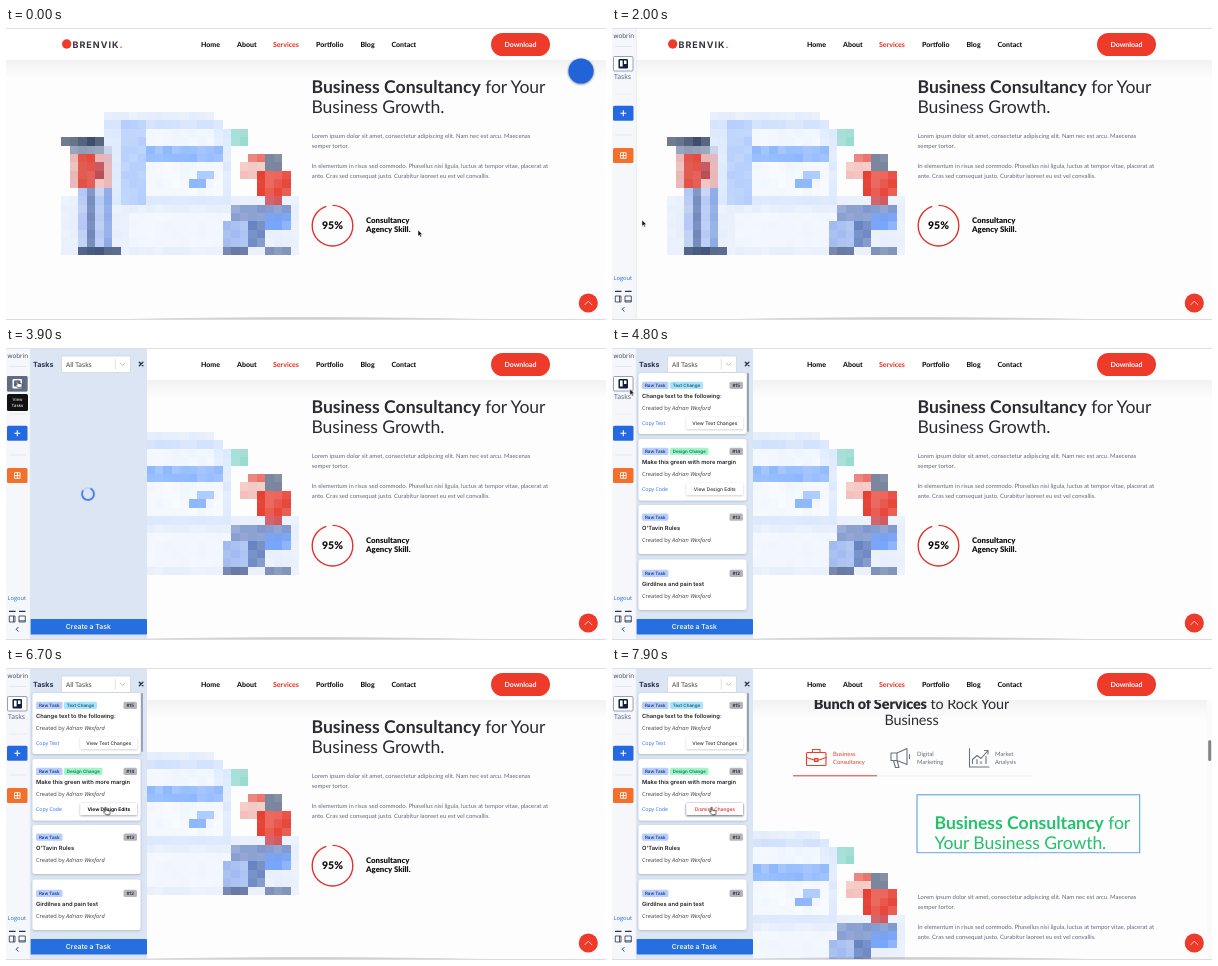
Animation of 600x292 px, one loop 8000 ms. Source, as an HTML page:

```html
<!DOCTYPE html>
<html lang="en">
<head>
<meta charset="utf-8">
<title>Consultancy page with task panel</title>
<style>
html, body { margin: 0; width: 100%; height: 100%; overflow: hidden; background: #fdfdfd; }
svg { display: block; width: 600px; height: 292px; }
text { font-family: Lato, sans-serif; text-rendering: geometricPrecision; white-space: pre; }
.mid { text-anchor: middle; }
.b { font-weight: 700; }
.black { font-weight: 900; }
.head { font-size: 17.6px; fill: #2d2b31; letter-spacing: -.1px; }
.head .b { letter-spacing: 0; }
.green { fill: #23c26b; }
.sub { font-size: 14.4px; }
.para { font-size: 5.96px; fill: #646a7e; }
.nav { font-size: 7px; font-weight: 800; fill: #111; }
.tab { font-size: 5.9px; fill: #666b7a; }
.red { fill: #ee3a2b; }
.ui { font-family: Inter, sans-serif; }
.os { font-family: "Open Sans", sans-serif; }
.title { font-size: 5.75px; font-weight: 600; fill: #222; }
.by { font-size: 5.7px; fill: #444; }
.chip { font-size: 4.5px; font-weight: 600; }
.link { font-size: 5.2px; fill: #2a6fe0; }
.btn { font-size: 4.9px; font-weight: 500; fill: #333; }
.line { fill: none; stroke-linecap: round; stroke-linejoin: round; }

/* hard switches */
.gone, .bar, .tip, .panel, .load, .cards, .hover, .old, .new, .drop, .dismiss, .thumb, .arrow, .hand {
  animation: 8s step-end infinite;
}
.gone { animation-name: gone; }
.bar { animation-name: bar; }
.tip { animation-name: tip; }
.panel { animation-name: panel; }
.load { animation-name: load; }
.cards { animation-name: cards; }
.hover { animation-name: hover; }
.old { animation-name: old; }
.new { animation-name: new; }
.drop { animation-name: drop; }
.dismiss, .thumb { animation-name: dismiss; }
.arrow { animation-name: arrow; }
.hand { animation-name: hand; }
@keyframes gone { 0% { opacity: 1 } 12.4%, 100% { opacity: 0 } }
@keyframes bar { 0% { opacity: 0 } 12.4%, 100% { opacity: 1 } }
@keyframes tip { 0% { opacity: 0 } 43.7% { opacity: 1 } 60%, 100% { opacity: 0 } }
@keyframes panel { 0% { opacity: 0 } 47.4%, 100% { opacity: 1 } }
@keyframes load { 0% { opacity: 1 } 56.2%, 100% { opacity: 0 } }
@keyframes cards { 0% { opacity: 0 } 56.2%, 100% { opacity: 1 } }
@keyframes hover { 0% { opacity: 0 } 68.7%, 100% { opacity: 1 } }
@keyframes old { 0% { opacity: 1 } 91.2%, 100% { opacity: 0 } }
@keyframes new { 0% { opacity: 0 } 91.2%, 100% { opacity: 1 } }
@keyframes drop { 0% { transform: none } 91.2%, 100% { transform: translateY(42.3px) } }
@keyframes dismiss { 0% { opacity: 0 } 92.4%, 100% { opacity: 1 } }
@keyframes arrow {
  0% { opacity: 1 } 8.5% { opacity: 0 } 12.4% { opacity: 1 } 43% { opacity: 0 }
  60% { opacity: 1 } 67% { opacity: 0 } 100% { opacity: 0 }
}
@keyframes hand {
  0% { opacity: 0 } 8.5% { opacity: 1 } 12.4% { opacity: 0 } 43% { opacity: 1 }
  60% { opacity: 0 } 67% { opacity: 1 } 100% { opacity: 1 }
}

/* continuous motion */
.scroll { animation: scroll 8s ease-in-out infinite; }
.cursor { animation: cursor 8s ease-in-out infinite; }
.spin { transform-origin: 82px 146px; animation: spin .9s linear infinite; }
@keyframes scroll { 0%, 92.4% { transform: none } 98.6%, 100% { transform: translateY(78.5px) } }
@keyframes spin { to { transform: rotate(360deg) } }
@keyframes cursor {
  0%, 2% { transform: translate(412px, 202px) }
  8.75% { transform: translate(573px, 44px) }
  13.75%, 15.5% { transform: translate(568px, 46px) }
  24% { transform: translate(30px, 192px) }
  36.25% { transform: translate(21.5px, 184px) }
  43%, 58% { transform: translate(10.5px, 32px) }
  68%, 100% { transform: translate(98.5px, 139px) }
}
</style>
</head>
<body>
<svg viewBox="0 0 600 292">
  <defs>
    <linearGradient id="shade" x2="0" y2="1">
      <stop stop-color="#000" stop-opacity=".045"/><stop offset="1" stop-color="#000" stop-opacity="0"/>
    </linearGradient>
    <radialGradient id="edge" cy="1" r=".5" fy="1">
      <stop stop-color="#666" stop-opacity=".35"/><stop offset=".75" stop-color="#666" stop-opacity=".25"/>
      <stop offset="1" stop-color="#666" stop-opacity="0"/>
    </radialGradient>
    <filter id="soft" x="-20%" y="-30%" width="140%" height="170%">
      <feDropShadow dx="0" dy=".8" stdDeviation="1" flood-color="#234" flood-opacity=".25"/>
    </filter>
    <filter id="glow" x="-30%" y="-30%" width="160%" height="160%">
      <feDropShadow dx="0" dy=".6" stdDeviation="1.300" flood-color="#123" flood-opacity=".6"/>
    </filter>
  </defs>
  <rect width="600" height="292" fill="#fdfdfd"/>

  <g class="scroll">
    <text class="head sub mid" x="299.500" y="-37.500"><tspan class="black">Bunch of Services</tspan> to Rock Your</text>
    <text class="head sub mid" x="299.500" y="-22">Business</text>
    <path d="M181 29.500H420" stroke="#e6e6ea" stroke-width=".6"/>
    <path d="M181 29.300H265" stroke="#ee3a2b"/>
    <g class="line" stroke="#ee3a2b" stroke-width="1.100">
      <rect x="194.500" y="6" width="19.500" height="13" rx="1"/>
      <path d="M200.500 6V3H208V6M194.500 11L202 13.500H207L214 11M202.500 12H206V15H202.500Z"/>
    </g>
    <g class="line" stroke="#6b7182" stroke-width="1.100">
      <path d="M279 6.500H285L295 2V18L285 14H279ZM285 6.500V14M281.500 14L283.500 21H287L285 14M297.500 8V12"/>
      <path d="M357.500 2V20.500H377M360.500 17V13L365 9L369 12L376 4M372.500 4H376V7.500M365 17V13M369 17V15M374 17V10"/>
    </g>
    <g class="tab">
      <text class="tab red" x="221" y="9">Business</text><text class="tab red" x="221" y="17.500">Consultancy</text>
      <text x="305" y="9">Digital</text><text x="305" y="17.500">Marketing</text>
      <text x="383" y="9">Market</text><text x="383" y="17.500">Analysis</text>
    </g>

    <g id="mosaic" shape-rendering="crispEdges"></g>

    <g class="old">
      <text class="head" x="305.500" y="65"><tspan class="b">Business Consultancy</tspan> for Your</text>
      <text class="head" x="305.500" y="85">Business Growth.</text>
    </g>
    <g class="new">
      <rect x="305" y="48.300" width="222.700" height="58" fill="none" stroke="#4f98e6"/>
      <text class="head green" x="322.500" y="82"><tspan class="b">Business Consultancy</tspan> for</text>
      <text class="head green" x="322.500" y="102">Your Business Growth.</text>
    </g>
    <g class="drop">
      <g class="para">
        <text x="305.700" y="110">Lorem ipsum dolor sit amet, consectetur adipiscing elit. Nam nec est arcu. Maecenas</text>
        <text x="305.700" y="120">semper tortor.</text>
        <text x="305.700" y="140.300">In elementum in risus sed commodo. Phasellus nisi ligula, luctus at tempor vitae, placerat at</text>
        <text x="305.700" y="150.300">ante. Cras sed consequat justo. Curabitur laoreet eu est vel convallis.</text>
      </g>
      <circle cx="326.500" cy="197.700" r="20.300" fill="none" stroke="#e0322b" stroke-width="1.400"
        pathLength="100" stroke-dasharray="95 100" transform="rotate(-90 326.500 197.700)"/>
      <text class="mid black" x="326.500" y="201.300" font-size="10.500" fill="#111">95%</text>
      <text class="black" x="360" y="195.300" font-size="7.800" fill="#111">Consultancy</text>
      <text class="black" x="360" y="204.300" font-size="7.800" fill="#111">Agency Skill.</text>
    </g>
  </g>

  <rect y="32" width="600" height="18" fill="url(#shade)"/>
  <rect width="600" height="32" fill="#fff"/>
  <path d="M0 .5H600" stroke="#e0e0e2"/>
  <circle cx="60.700" cy="16" r="4.700" class="red"/>
  <text class="ui b" x="66.500" y="19.500" font-size="9" letter-spacing="1" fill="#33313a">BRENVIK<tspan class="red">.</tspan></text>
  <g class="nav">
    <text x="195" y="18.800">Home</text><text x="231" y="18.800">About</text>
    <text class="nav red" x="267" y="18.800">Services</text><text x="310" y="18.800">Portfolio</text>
    <text x="354.500" y="18.800">Blog</text><text x="385.500" y="18.800">Contact</text>
  </g>
  <rect x="485" y="5" width="59" height="23" rx="11.500" class="red"/>
  <text class="mid b" x="514.500" y="18.700" font-size="7" fill="#fff">Download</text>

  <circle cx="582.300" cy="275" r="9.600" class="red"/>
  <path class="line" d="M578.700 276.800L582.300 273.200L585.900 276.800" stroke="#fff" stroke-width=".8"/>
  <circle class="gone" cx="575" cy="43" r="12.600" fill="#2264d8" filter="url(#glow)"/>
  <rect x="118" y="287" width="364" height="4" fill="url(#edge)"/>
  <path d="M0 291.500H600" stroke="#dcdcde"/>
  <g class="thumb">
    <rect x="595" y="32" width="5" height="259" fill="#fafafa"/>
    <rect x="596.200" y="72" width="3" height="21" rx="1.500" fill="#858585"/>
  </g>

  <g class="panel">
    <rect x="24" y="1" width="117" height="290" fill="#dbe5f4"/>
    <text class="ui b" x="27" y="18.500" font-size="7.100" fill="#25304a">Tasks</text>
    <rect x="55.500" y="8" width="69" height="16.500" rx="1.500" fill="#fff" stroke="#c9ced8" stroke-width=".6"/>
    <text class="os" x="60" y="18.700" font-size="6.600" fill="#333">All Tasks</text>
    <path d="M109.300 11V21.500" stroke="#ccc" stroke-width=".6"/>
    <path class="line" d="M114.300 15L116.700 17.400L119.100 15" stroke="#bbb"/>
    <path class="line" d="M133.300 14.200L136.900 17.800M136.900 14.200L133.300 17.800" stroke="#25304a" stroke-width="1.300"/>
    <g class="load">
      <circle cx="82" cy="146" r="6" fill="none" stroke="#c3d3ec" stroke-width="1.600"/>
      <path class="line spin" d="M76 146A6 6 0 1 1 82 152" stroke="#2f6fd8" stroke-width="1.700"/>
    </g>
    <g id="cards" class="cards"></g>
    <rect x="24" y="271" width="117" height="15.500" rx="1" fill="#266fe0"/>
    <text class="ui mid" x="82.300" y="281.300" font-size="6.900" font-weight="500" fill="#fff">Create a Task</text>
  </g>

  <g class="bar">
    <rect y="1" width="24" height="290" fill="#f5f7fb"/>
    <path d="M24.300 1V291" stroke="#e3e8f0" stroke-width=".8"/>
    <text class="os" x="1.500" y="10" font-size="6.300" fill="#34415c">wobrin</text>
    <path d="M3 18.500H20M3 66H20M3 107H20" stroke="#dde2ea" stroke-width=".7"/>
    <rect x="1.500" y="28.500" width="19.500" height="14.500" rx="1" fill="#fff" stroke="#6d7b93" stroke-width=".7"/>
    <rect x="6.500" y="31" width="9.500" height="9.500" rx="1.200" fill="#14213d"/>
    <path d="M8 32.500H10.600V38.500H8ZM12 32.500H14.500V36H12Z" fill="#fff"/>
    <text class="os" x="2" y="51.300" font-size="6.800" fill="#505c74">Tasks</text>
    <rect x="1" y="77.700" width="20.500" height="15" rx="1.500" fill="#2469e0"/>
    <path d="M8.300 85.200H14.300M11.300 82.200V88.200" stroke="#fff" stroke-width="1.100"/>
    <rect x="1" y="120" width="20.500" height="15" rx="1.500" fill="#f3702c"/>
    <path d="M8.500 124.700H14.100V130.300H8.500ZM8.500 127.500H14.100M11.300 124.700V130.300" fill="none" stroke="#fff" stroke-width=".9"/>
    <text class="os" x="1.500" y="251.500" font-size="5.700" fill="#2469e0">Logout</text>
    <path d="M3 263.300H9.500M13 263.300H19.500" stroke="#26334f" stroke-width="1.200"/>
    <path d="M3.300 268H9V274H3.300ZM13 268H19.300V274H13ZM7.500 268V274M13 272.800H19.300" fill="none" stroke="#26334f" stroke-width=".8"/>
    <path class="line" d="M12.200 279.300L10.200 281.300L12.200 283.300" stroke="#26334f" stroke-width=".9"/>
  </g>
  <g class="tip">
    <rect x="1" y="28" width="20.500" height="15.500" rx="1" fill="#5f6c84"/>
    <rect x="6.500" y="31" width="9.500" height="9.500" rx="1.200" fill="#fff"/>
    <path d="M8 32.500H10.600V38.500H8ZM12 32.500H14.500V36H12Z" fill="#5f6c84"/>
    <rect x="1" y="46" width="21" height="17" rx="1.500" fill="#111"/>
    <text class="ui mid" x="11.500" y="53.300" font-size="4.300" fill="#fff">View</text>
    <text class="ui mid" x="11.500" y="59.300" font-size="4.300" fill="#fff">Tasks</text>
  </g>

  <g class="cursor" stroke-linejoin="round">
    <path class="arrow" d="M0 0V6.300L1.500 5L2.500 7.300L3.600 6.800L2.600 4.600H4.600Z" fill="#111" stroke="#fff" stroke-width=".5"/>
    <path class="hand" d="M.4 .5Q1.200 -.1 1.800 .6V3.200L5.200 3.900Q5.800 4.300 5.600 5.300L5 7.800H1.500L-1.200 4.900Q-1.100 3.900 .4 4.700Z" fill="#fff" stroke="#111" stroke-width=".7"/>
  </g>
</svg>

<script>
const put = (id, html) => { document.getElementById(id).innerHTML = html; };
const text = (x, y, cls, s, more = "") => `<text x="${x}" y="${y}" class="${cls}" ${more}>${s}</text>`;

// Task cards
function chip(x, y, w, fill, ink, label) {
  return `<rect x="${x}" y="${y}" width="${w}" height="7.200" rx="1.500" fill="${fill}"/>` +
    text(x + w / 2, y + 5.2, "ui chip mid", label, `fill="${ink}"`);
}

function button(y, label, fill = "#fff", style = "") {
  return `<rect x="74.500" y="${y}" width="56.500" height="12" rx="1" fill="${fill}" filter="url(#soft)"/>` +
    text(102.8, y + 7.8, "ui btn mid", label, `style="${style}"`);
}

function card(top, height, head, id, title, tag = "") {
  return `<rect x="26.500" y="${top}" width="108" height="${height}" rx="2.500" fill="#fff" filter="url(#soft)"/>` +
    chip(30, head, 26.5, "#b8cffb", "#1d3f86", "Raw Task") + tag +
    chip(117.5, head, 13.5, "#b3b6bc", "#222", "#" + id) +
    text(30, head + 16.3, "ui title", title) +
    text(30, head + 28, "os by", 'Created by <tspan font-style="italic">Adrian Wexford</tspan>');
}

put("cards",
  card(25, 61, 33.7, 15, "Change text to the following:", chip(58, 33.7, 33, "#a9e2fa", "#12607f", "Text Change")) +
  text(30, 76.8, "os link", "Copy Text") + button(69, "View Text Changes") +
  card(91, 61.5, 99.7, 14, "Make this green with more margin", chip(58, 99.7, 38.5, "#a3f3cb", "#137a4b", "Design Change")) +
  text(30, 142.8, "os link", "Copy Code") + button(135, "View Design Edits") +
  `<g class="hover">${button(135, "View Design Edits", "#fff", "font-weight:700;fill:#111")}</g>` +
  `<g class="new">${button(135, "Dismiss Changes", "#e9e9eb", "font-weight:600;fill:#222")}</g>` +
  `<g class="dismiss">${button(135, "Dismiss Changes", "#fff", "font-weight:500;fill:#d92b2b")}</g>` +
  card(157, 49, 165.5, 13, "O'Tavin Rules") +
  card(211.5, 50.5, 221.7, 12, "Girdilnes and pain test") +
  '<rect x="135" y="25" width="2" height="59" rx="1" fill="#9ba3b0"/>');

// Blocky illustration: column, row, width, height, colour
const cellW = 8.5, cellH = 8.41;
const blocks = [
  [0, 10, 28, 7, "#e7effc"], [5, 0, 13, 1, "#e4edfd"], [5, 1, 14, 1, "#d0e0fd"],
  [5, 2, 15, 9, "#dce9fe"], [7, 1, 3, 10, "#b5cffd"], [10, 2, 8, 2, "#f5f9ff"],
  [10, 4, 9, 2, "#8fb8ff"], [10, 6, 9, 4, "#f8fbff"], [16, 7, 2, 1, "#a9c9ff"],
  [15, 8, 2, 1, "#8db6fb"], [8, 12, 12, 4, "#f4f8ff"], [20, 2, 2, 2, "#93dacf"],
  [0, 3, 5, 1, "#3c4c6b"], [1, 4, 4, 1, "#8c9ab4"], [5, 4, 1, 2, "#c6d3ea"],
  [1, 5, 5, 4, "#e9b3b3"], [2, 5, 2, 4, "#e2483c"], [4, 6, 1, 2, "#b9434a"],
  [2, 9, 4, 7, "#b3c8f4"], [3, 9, 1, 7, "#7187b8"], [5, 9, 1, 7, "#8fabe6"],
  [2, 16, 5, 1, "#43557b"],
  [24, 5, 2, 2, "#6f7c95"], [21, 6, 3, 2, "#f3c0bb"], [22, 5, 2, 1, "#ea7066"],
  [23, 7, 4, 3, "#e63b2e"], [24, 10, 2, 1, "#d0434a"], [20, 11, 7, 2, "#7f97cc"],
  [24, 12, 3, 2, "#78a6fa"], [19, 13, 4, 3, "#9db9f0"], [22, 13, 2, 3, "#6480bd"],
  [19, 16, 3, 1, "#62759f"], [24, 16, 3, 1, "#7084ae"]
];
let seed = 11;
const random = () => (seed = seed * 16807 % 2147483647) / 2147483647;
let tiles = "";
for (const [col, row, w, h, fill] of blocks)
  for (let i = 0; i < w * h; i++) {
    const x = 55 + cellW * (col + i % w), y = 84 + cellH * (row + Math.floor(i / w));
    tiles += `<rect x="${x}" y="${y}" width="${cellW}" height="${cellH}" fill="${fill}" fill-opacity="${0.72 + 0.28 * random()}"/>`;
  }
put("mosaic", tiles);
</script>
</body>
</html>
```
